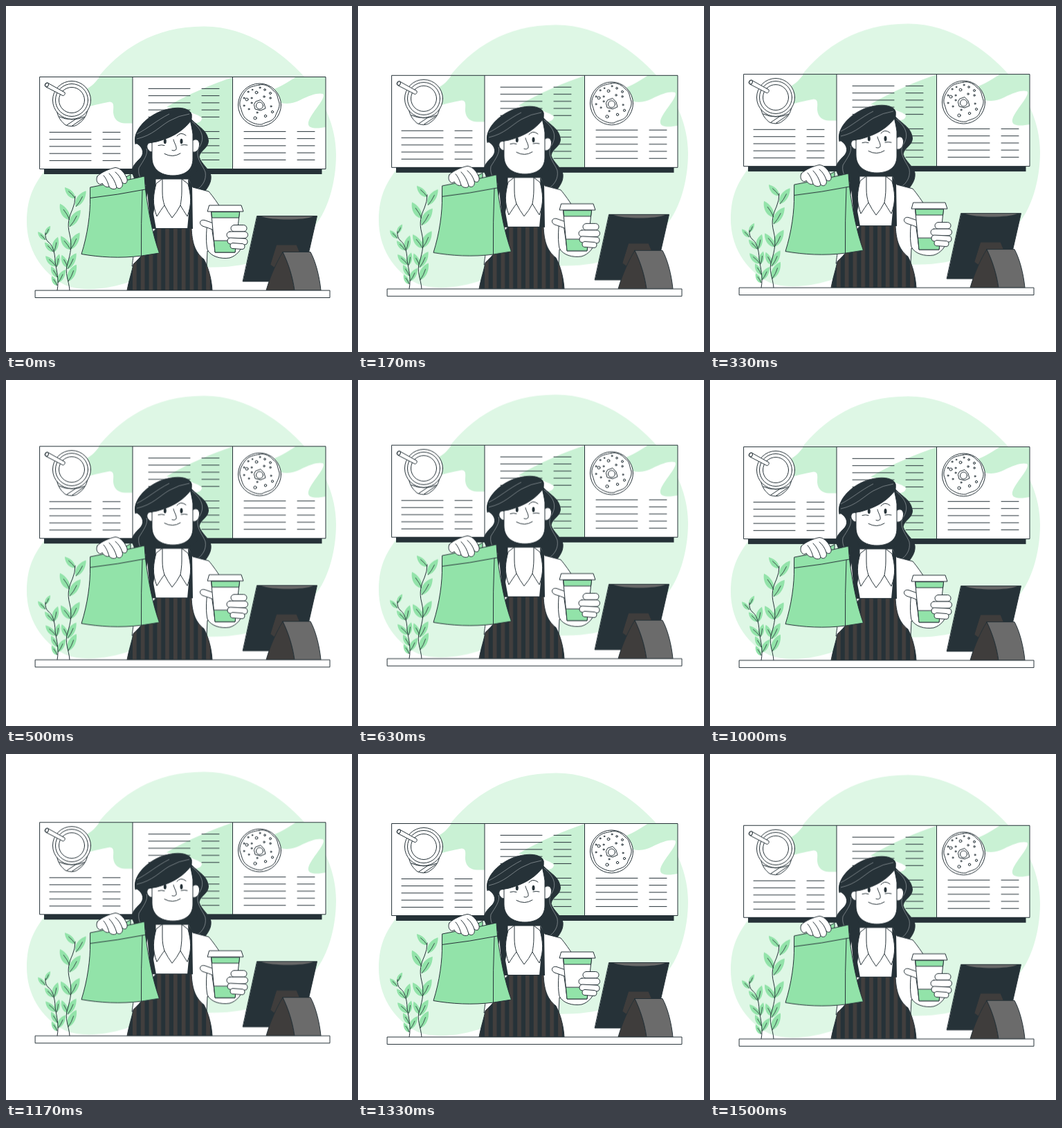
An HTML page without scripts for the animation above (1540 ms loop, 500x500 px).

```html
<!DOCTYPE html>
<html lang="en">
<head>
<meta charset="utf-8">
<title>Coffee counter</title>
<style>
  html, body { margin: 0; width: 100%; height: 100%; overflow: hidden; background: #fff; }
  svg { display: block; width: 100vw; height: 100vh; }
  .scene { animation: bob 1.54s infinite; }
  /* 37 frames; the turning point lies between frames 17 and 18 */
  @keyframes bob {
    0% { transform: translateY(0); animation-timing-function: steps(17); }
    45.946% { transform: translateY(-9.44px); animation-timing-function: steps(1); }
    48.649% { transform: translateY(-9.26px); animation-timing-function: steps(19); }
    100% { transform: translateY(1.3px); }
  }
  .ink { stroke: #263238; stroke-width: 1; stroke-linejoin: round; stroke-linecap: round; }
  .white { fill: #fff; }
  .dark { fill: #263238; }
  .brown { fill: #3f3d3c; }
  .green { fill: #92e3a9; }
  .mint { fill: #c9f1d4; }
  .line { fill: none; }
  .strand { fill: none; stroke: #aeb4b7; stroke-width: .6; }
  .vein { fill: none; stroke: #263238; stroke-width: .8; vector-effect: non-scaling-stroke; }
</style>
</head>
<body>
<svg viewBox="0 0 500 500">
  <defs>
    <path id="row" d="M0 0h60m17 0h25"/>
    <g id="rows">
      <use href="#row"/><use href="#row" y="10.25"/><use href="#row" y="20.5"/>
      <use href="#row" y="30.75"/><use href="#row" y="41"/>
    </g>
    <g id="leaf">
      <path class="green" d="M0 0C-6 -4 -5.500 -14 0 -20C4 -14 5 -5 0 0Z"/>
      <path class="vein" d="M0 0Q1 -6 0 -13"/>
    </g>
    <pattern id="stripes" x="183" width="11.8" height="20" patternUnits="userSpaceOnUse">
      <rect class="dark" width="12" height="20"/>
      <rect width="5.6" height="20" fill="#423f3e"/>
    </pattern>
  </defs>

  <g class="scene">
    <path fill="#def7e5" d="M30 312C30 275 42 255 62 230C90 195 100 140 130 107C165 62 215 29 287 29.5C350 30 400 68 430 101C460 135 477 175 477 215C477 255 465 300 440 325C405 360 350 378 300 377.5C255 378 215 385 180 398C150 409 110 414 85 403C50 385 30 350 30 312Z"/>

    <g id="menu">
      <rect class="dark" x="55" y="235" width="401.5" height="8"/>
      <rect class="white" x="49" y="102.5" width="413" height="133"/>
      <g class="mint">
        <path d="M135 102.5C130 110 124 116 115 121V147C130 142 143 140 150 138.5C157 139 155 146 155 154C156 165 163 169 172 169.5H183V102.5Z"/>
        <path d="M327.5 103C300 112 262 128 232 146L262 152C270 155 280 158 283 162C283 168 276 169 272 170L280 235.5H327.5Z"/>
        <path d="M419 102.5C405 112 395 117 383 122L390 138C405 143 415 141 425 136C440 128 452 125 458 127C462 131 452 143 445 153C437 164 434 172 440 175C447 178 455 176 462 175V102.5Z"/>
      </g>
      <g class="ink line">
        <path d="M49 102.5H462V235.5H49ZM183 102.5v133M327.5 102.5v133"/>
        <use href="#rows" x="63" y="182.4"/>
        <use href="#rows" x="206" y="119.4"/>
        <use href="#rows" x="206" y="181.4"/>
        <use href="#rows" x="344" y="181.4"/>
      </g>

      <g class="ink white">
        <path d="M73 150C75 162 81 168 86 172C94 175 101 174 105 170C111 166 116 160 118 150Z"/>
        <path class="line" d="M88 172L103 162M95 173.5L112 162M77 160Q95 168 114 160"/>
        <circle cx="95" cy="136" r="27.5"/>
        <circle cx="95" cy="136" r="23.5"/>
        <circle cx="95" cy="136" r="18.5"/>
        <path d="M60.500 111.300L85 125C86 127 84 130 82 129.500L57.500 116.800C54.500 114.500 57 110.500 60.500 111.300Z"/>
        <ellipse cx="59" cy="114" rx="2.300" ry="2.900" transform="rotate(25 59 114)"/>
      </g>

      <g class="ink white" stroke-width=".9">
        <circle cx="366.500" cy="143" r="31"/>
        <path d="M366 114C374 112 382 117 386 122C393 126 392 133 395 140C396 148 391 153 389 160C384 168 376 167 370 171C361 172 354 168 348 164C341 159 341 151 338 144C337 136 341 130 345 124C351 116 358 116 366 114Z"/>
        <path d="M361 138L368 135.500L373 141L375 148L368 151L360 149L358.500 143Z"/>
        <circle cx="366.500" cy="144" r="5"/>
        <g>
          <circle cx="350" cy="124" r="1"/><circle cx="356" cy="121" r=".8"/>
          <circle cx="362" cy="125" r="1.900"/><circle cx="367" cy="118" r="1"/>
          <circle cx="374" cy="121" r="1.300"/><circle cx="382" cy="126" r="1.500"/>
          <circle cx="373" cy="131" r="1.200"/><circle cx="382" cy="133" r="1.200"/>
          <circle cx="355" cy="133" r="1"/><circle cx="348" cy="135" r="2"/>
          <circle cx="344" cy="133" r="1"/><circle cx="344" cy="144" r="1"/>
          <circle cx="355" cy="140" r="1"/><circle cx="351" cy="149" r="1"/>
          <circle cx="363" cy="154" r="1"/><circle cx="360" cy="162" r="2.100"/>
          <circle cx="375" cy="159" r="1.700"/><circle cx="385" cy="153" r="1.600"/>
          <circle cx="383" cy="145" r="1"/>
        </g>
      </g>
    </g>

    <g id="plants">
      <use href="#leaf" transform="translate(100 278)rotate(-43)scale(1.1)"/>
      <use href="#leaf" transform="translate(101 290)rotate(33)scale(1.35)"/>
      <use href="#leaf" transform="translate(92 309)rotate(-31)scale(1.35)"/>
      <use href="#leaf" transform="translate(92 319)rotate(33)scale(1.45)"/>
      <use href="#leaf" transform="translate(93 352)rotate(-35)scale(1.2)"/>
      <use href="#leaf" transform="translate(93 352)rotate(29)scale(1.4)"/>
      <use href="#leaf" transform="translate(89 378)rotate(-25)"/>
      <use href="#leaf" transform="translate(89 380)rotate(29)scale(1.3)"/>
      <use href="#leaf" transform="translate(90 398)rotate(26)scale(1.35)"/>
      <use href="#leaf" transform="translate(57 331)rotate(28)scale(.75)"/>
      <use href="#leaf" transform="translate(57 338)rotate(-43)scale(.8)"/>
      <use href="#leaf" transform="translate(69 356)rotate(15)scale(1.15)"/>
      <use href="#leaf" transform="translate(68 355)rotate(-42)scale(.9)"/>
      <use href="#leaf" transform="translate(72 376)rotate(-45)scale(1.05)"/>
      <use href="#leaf" transform="translate(73 377)rotate(12)scale(.95)"/>
      <use href="#leaf" transform="translate(74 392)rotate(-29)scale(.9)"/>
      <use href="#leaf" transform="translate(75 400)rotate(30)scale(1.1)"/>
      <use href="#leaf" transform="translate(74 404)rotate(-30)scale(.8)"/>
      <path class="ink line" d="M92 411C91 396 84 386 89 372C93 358 96 346 92 330C88 315 91 305 96 294Q100 285 100 275M74 411C77 396 73 382 71 370C71 354 66 344 61 341Q56 336 57 328"/>
    </g>

    <g id="barista">
      <path class="ink dark" d="M188 198C197 203 201 212 194 220C186 228 180 234 183 243C187 250 186 258 192 264L208 275H272L288 267C293 260 297 254 296 245C294 236 282 228 279 218C281 208 292 206 292.500 195C291 180 280 176 268 164V156L200 190Z"/>
      <path class="strand" d="M269 167C280 176 289 188 280 203C271 217 284 229 288 240C290 252 283 260 278 264M203 206C206 214 198 224 192 234C190 246 197 252 202 260"/>

      <path class="ink white" d="M205 268L216 262V250H264L270 262L293 268C299 275 306 285 313 296L320 362L291 354L290 376H182C183 370 184 360 186 350Z"/>
      <path class="dark" d="M203 256L216 250V286L213 300L217 322H209ZM263 250L269 259L270 322H262L265 290Z"/>
      <path class="ink white" d="M217 257C213 272 211 286 218 304C222 298 225 293 229 288Q234 298 240 306Q247 298 252 288C255 293 258 298 262 304C269 286 267 272 263 257L254 250H226Z"/>
      <path class="ink line" d="M226 250V268C226 276 227 282 229 288M254 250V268C254 276 253 282 252 288"/>
      <path class="ink" fill="url(#stripes)" d="M217 321.500H268C269 340 272 355 286 366C293 379 297 395 298 411H175C178 395 182 384 184 373C194 364 205 352 210 330Z"/>

      <path class="ink white" d="M268 196C274 190 280 193 279.500 201C279 208 275 212 270 211ZM212 198C206 196 203 200 204 205C206 210 209 211 212 211Z"/>
      <path class="dark" d="M211 222H271L277 238C270 247 260 251 254 250Q240 247 226 250C215 249 210 238 211 222Z"/>
      <path class="ink white" d="M211 190V219C211 236 224 245 241 245C258 245 270 237 270 221V185C269 177 267 170 266 164Z"/>
      <path class="ink dark" d="M187 199C182 180 205 157 230 150C248 145 262 147 267 154C269 159 268 164 265.500 168C252 184 236 191 218 196C206 199 196 197 187 199Z"/>
      <path class="strand" d="M189 192C212 187 222 174 236 166Q250 158 265 156M189 185C205 177 218 165 236 156"/>
      <ellipse class="dark" cx="229.800" cy="195.500" rx="2" ry="3.800"/>
      <ellipse class="dark" cx="253.500" cy="195.500" rx="2" ry="3.800"/>
      <path class="ink line" d="M247 188Q252 181 260 187M220 201.500Q225 200 229 201.500M253 201Q258 200 262 201M242 193C243 198 247 203 246 207Q244 210 240 208.500M229 213.500Q241 220 252 213"/>
    </g>

    <g id="bag" class="ink">
      <path class="green" d="M168 250L180 243.500V252Z"/>
      <path class="green" d="M122 262L173 252L200 246L201.500 265C206 300 212 330 221.500 357L196 361C165 365 135 363 109 358.500C118 330 122 300 121.500 278Z"/>
      <path class="line" d="M121.500 277.500Q161 273 201.500 265M197 266Q195 315 195.500 361"/>
      <path class="white" d="M132 246C138 240 150 235 158 233.500C166 234 172 242 175 250C176 257 171 258 168 255C170 262 164 266 160 262C159 266 151 265 149 261C146 263 141 260 139 256C136 261 128 254 132 246Z"/>
      <path class="line" d="M168 255C166 249 163 244 158 240M160 262C158 254 154 247 149 242M149 261C147 254 144 248 141 245"/>
    </g>

    <g id="coffee" class="ink white">
      <path d="M291 312C289 330 289 342 291 352C296 362 310 366 323 364C334 361 341 351 344 340L328 320L302 352L297 318Z"/>
      <path d="M302 325C295 321 289 320 284 318C278 315 280 308 287 309.500L300 314Z"/>
      <path d="M296.500 297.500L302 356H331L337.500 297.500Z"/>
      <path class="green" d="M296.800 298L297.700 306H336.600L337.500 298ZM300.500 339.500L302 356H331L333 339.500Z"/>
      <path d="M294 288H340L343 297H291.500Z"/>
      <rect x="325" y="316.500" width="23" height="9.500" rx="4.700"/>
      <rect x="319" y="326" width="30.500" height="9.500" rx="4.700"/>
      <rect x="320" y="335.500" width="29" height="9" rx="4.500" transform="rotate(3 334 340)"/>
      <rect x="324" y="343" width="21" height="8" rx="4" transform="rotate(4 334 347)"/>
    </g>

    <g id="till" class="ink">
      <path class="dark" d="M363 303.500H449.500L428 398H342.500Z"/>
      <path fill="#686868" stroke="none" d="M369 304H444C430 310 385 310 369 304Z"/>
      <path class="brown" d="M391 345H420L425 357H401L389 379L382 374Z"/>
      <path class="brown" d="M400 355.500C390 372 382 390 376 411H417C414 390 408 372 400 355.500Z"/>
      <path fill="#6b6b6b" d="M400 355.500H440C447 368 453 390 455 411H417C414 390 408 372 400 355.500Z"/>
    </g>

    <rect class="ink white" x="42.500" y="411" width="425.500" height="10.500"/>
  </g>
</svg>
</body>
</html>
```
